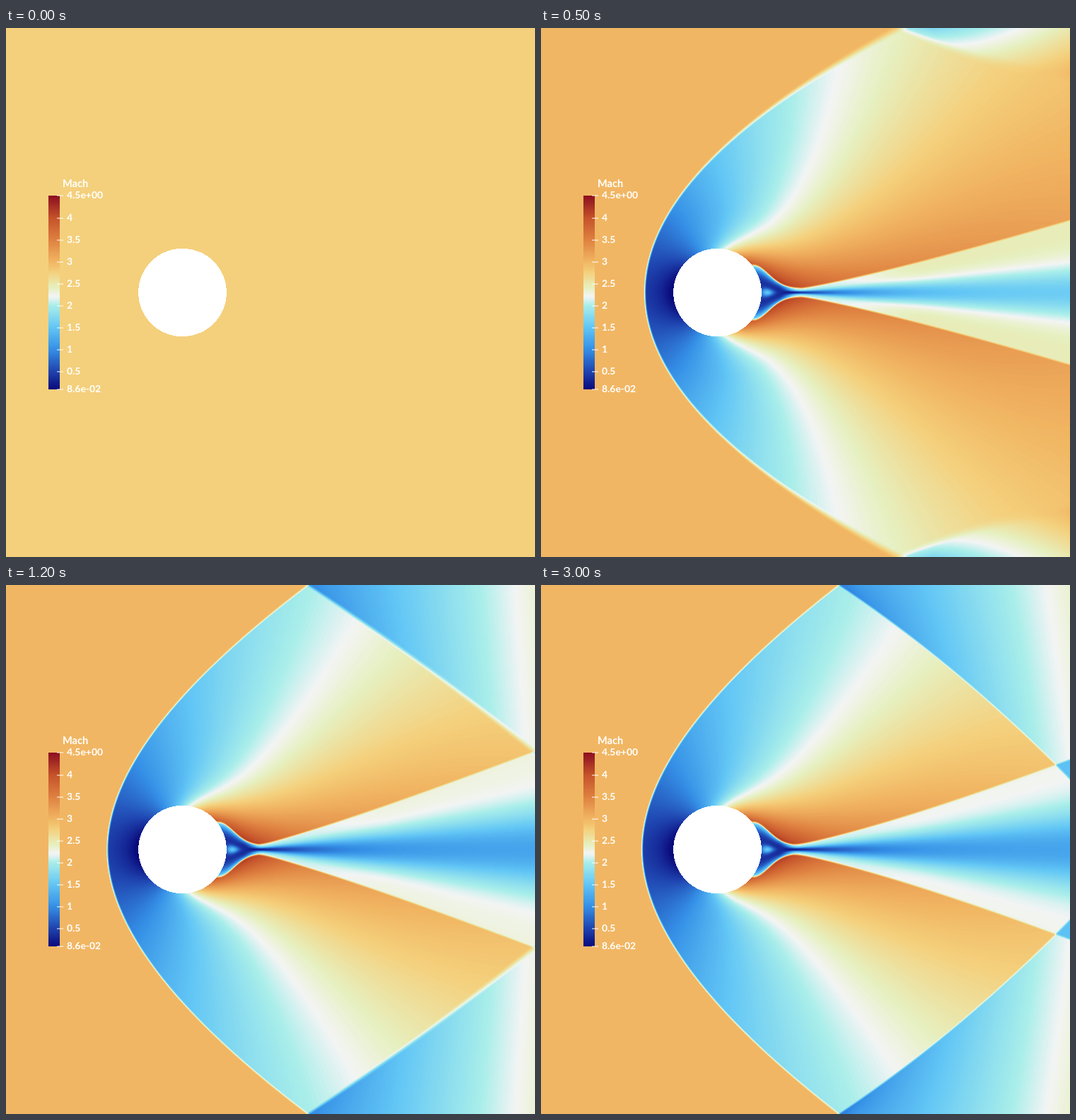
An HTML page with a canvas for the animation above (3.1 s loop, 748 px wide and 748 px high).

```html
<!DOCTYPE html>
<html lang="en">
<head>
<meta charset="utf-8">
<title>Mach number around a cylinder</title>
<style>
  html, body { margin: 0; width: 100%; height: 100%; overflow: hidden; }
  canvas, svg { position: absolute; left: 0; top: 0; width: 748px; height: 748px; }
  text { font: 700 13.9px Lato, "Open Sans", sans-serif; fill: #fff; }
  .title { font-size: 14.6px; }
</style>
</head>
<body>
<canvas id="flow" width="748" height="748"></canvas>
<svg id="legend" viewBox="0 0 748 748">
  <circle cx="249.5" cy="374" r="62.3" fill="#fff" shape-rendering="crispEdges"/>
  <text class="title" x="80" y="225">Mach</text>
</svg>
<script>
const SIZE = 748, MID = 374, CX = 249.5, RADIUS = 62;
const STEP = 100, STEPS = 31, SETTLED = 18;
const LOW = 0.086, HIGH = 4.5;
const BAR = { x: 60, y: 237, w: 16, h: 274 };

// Colour map: Mach number to colour
const STOPS = [
  [LOW, 0x0a0a7c], [0.5, 0x1f45b0], [1, 0x3590e6], [1.5, 0x62c6f5],
  [2, 0xa9eeea], [2.2, 0xf3f4f4], [2.4, 0xe6f0c0], [2.75, 0xf4d07c],
  [3, 0xf1b562], [3.5, 0xde8040], [4, 0xc4522a], [HIGH, 0x8c0f20]
];

const { exp, max, min, hypot } = Math;
const mix = (a, b, t) => a + (b - a) * t;
const clamp = v => max(0, min(1, v));
const smooth = (a, b, v) => {
  const t = clamp((v - a) / (b - a));
  return t * t * (3 - 2 * t);
};
const bell = v => exp(-v * v);

const palette = Uint32Array.from({ length: 256 }, (_, n) => {
  const m = mix(LOW, HIGH, n / 255);
  const i = max(1, STOPS.findIndex(stop => stop[0] >= m - 1e-9));
  const [m0, c0] = STOPS[i - 1], [m1, c1] = STOPS[i], t = (m - m0) / (m1 - m0);
  const channel = s => Math.round(mix(c0 >> s & 255, c1 >> s & 255, t));
  return (255 << 24 | channel(0) << 16 | channel(8) << 8 | channel(16)) >>> 0;
});
const colorOf = m => palette[Math.round(clamp((m - LOW) / (HIGH - LOW)) * 255)];

// Stages of the flow, blended in time:
// nose, bend, flare, fuzz   bow shock position, shape and softness far out
// heat                      extra Mach number away from the body
// neck, open, power         wake outline
// core, rim, spread, cap    Mach on the wake axis and rim, core width, wake tip
// dive, curl, haze          reflected shock slope, curvature, softness
// after, drop               Mach number behind the reflected shock
const STAGES = [
  { at: 3, nose: 150, bend: 390, flare: -0.3, fuzz: 14, heat: 0.6,
    neck: 375, open: 0.145, power: 1.1, core: 1.15, rim: 2.5, spread: 0.58, cap: 700,
    dive: 0, curl: 0, haze: 1, after: 1.5, drop: -0.5 },
  { at: 5, nose: 147, bend: 366, flare: 0.06, fuzz: 6, heat: 0.35,
    neck: 368, open: 0.102, power: 1.153, core: 1.6, rim: 2.45, spread: 0.38, cap: 1100,
    dive: 0.45, curl: -0.0007, haze: 12, after: 1.5, drop: -0.5 },
  { at: 9, nose: 144, bend: 365, flare: 0.313, fuzz: 0, heat: 0.1,
    neck: 358, open: 0.277, power: 1, core: 1.2, rim: 2.35, spread: 0.4, cap: 1100,
    dive: 0.64, curl: -0.0001, haze: 10, after: 1, drop: -0.05 },
  { at: SETTLED, nose: 143, bend: 365, flare: 0.369, fuzz: 0, heat: 0,
    neck: 356, open: 0.0936, power: 1.2, core: 1.2, rim: 2.23, spread: 0.42, cap: 1100,
    dive: 0.66, curl: 0.00055, haze: 1, after: 1, drop: 0.15 }
];

function stageAt(k) {
  const i = max(0, STAGES.findLastIndex(s => s.at <= k));
  const a = STAGES[i], b = STAGES[min(i + 1, STAGES.length - 1)];
  let t = a === b ? 0 : clamp((k - a.at) / (b.at - a.at));
  if (b.at === SETTLED) t = 1 - (1 - t) ** 2;
  const s = {};
  for (const name in a) s[name] = mix(a[name], b[name], t);
  return s;
}

// Flow between bow shock and wake: rises with the angle from the nose,
// plus an expansion that hugs the body
function outerMach(s, dx, y, r) {
  const c = -dx / r, front = c > 0;
  const t = max(0, (Math.atan2(y, -dx) - Math.PI / 2) / 1.396);
  const base = front ? 1.45 - 0.85 * c : 1.45 + 1.2 * t + 0.5 * t * t;
  const near = front ? 0.4 * exp(-5 * c) - 0.5 * c * c : 0.4 + 3 * t - 1.8 * t * t;
  const reach = 12 + (front ? 13 * c : 28 * t);
  const away = max(0, r - 120);
  return base + near * exp((RADIUS - r) / reach) + 0.0005 * (r - 250)
    + t ** 3 * (0.25 - 0.0016 * away) + s.heat * (1 - exp(-away / 250));
}

const wakeHeight = (s, x) =>
  6 + 33 * bell((x - 300) / 31) + s.open * max(0, x - s.neck) ** s.power;

function wakeMach(s, x, part) {
  const still = 0.3 + 1.8 * part ** 4 + 1.2 * bell((x - 320) / 9) * bell(part / 0.2);
  const rim = mix(2.1, s.rim, smooth(380, 550, x));
  const axis = s.core * (1 - exp(-max(0, x - 345) / 90));
  const core = mix(axis, rim, smooth(s.cap - 60, s.cap + 60, x));
  return mix(still, mix(rim, core, bell(part / s.spread)), smooth(335, 365, x));
}

function machField(k) {
  if (!k) return () => 2.75;
  const s = stageAt(k);
  const grow = min(1, k / 3) ** 0.8;
  const inflow = 177 * k;
  const shockX = y => s.nose + y * y / (s.bend + s.flare * y);
  const corner = shockX(MID);

  return (px, py) => {
    const free = mix(3, 2.75, smooth(inflow - 25, inflow + 25, px));
    let dx = px - CX, y = py, r = hypot(dx, y);
    if (r < RADIUS - 2) return free;

    // While it starts up, the pattern swells out from the body
    const swell = (RADIUS + (r - RADIUS) / grow) / r;
    dx *= swell; y *= swell; r *= swell;
    const x = CX + dx;

    // Bow shock, measured across the front
    const yc = min(y, MID), slope = shockX(yc + 1) - shockX(yc);
    const gap = (x - shockX(yc) - 2.2 * (y - yc)) / hypot(1, slope);
    const width = 2.2 + s.fuzz * (yc / MID) ** 3;
    let inside = smooth(-width, width, gap);
    if (grow < 1) inside *= 1 - smooth(380, 600, r);
    if (!inside) return free;

    let m = outerMach(s, dx, y, r);

    // Reflected shock
    const run = x - corner;
    let past = 0;
    if (run > -10 && s.dive) {
      const q = MID - s.dive * run - s.curl * run * run;
      const w = 2 + s.haze * clamp(0.3 + run / 330);
      past = smooth(-w, w, y - q);
      const low = 1 - clamp((y - q) / max(20, MID - q));
      m = mix(m, s.after + 0.0041 * max(0, run) - s.drop * low, past);
    }

    // Wake
    if (dx > 0) {
      const h = wakeHeight(s, x), part = 1 - smooth(-2, 2, y - h);
      if (part) m = mix(m, mix(wakeMach(s, x, min(1, y / h)), 1.45, past), part);
    }
    return mix(free, m, inside);
  };
}

function render(k) {
  const image = new ImageData(SIZE, SIZE), pixels = new Uint32Array(image.data.buffer);
  const mach = machField(k);
  for (let row = 0; row < MID; row++) {
    const a = row * SIZE, b = (SIZE - 1 - row) * SIZE;
    for (let x = 0; x < SIZE; x++)
      pixels[a + x] = pixels[b + x] = colorOf(mach(x + 0.5, MID - row - 0.5));
  }
  for (let j = 0; j < BAR.h; j++) {
    const at = (BAR.y + j) * SIZE + BAR.x;
    pixels.fill(colorOf(mix(HIGH, LOW, j / (BAR.h - 1))), at, at + BAR.w);
  }
  return image;
}

// Legend ticks and labels
const legend = document.getElementById("legend");
function add(tag, attrs, text = "") {
  const el = document.createElementNS(legend.namespaceURI, tag);
  for (const name in attrs) el.setAttribute(name, attrs[name]);
  el.textContent = text;
  legend.append(el);
}
function addTick(m, label) {
  const y = Math.ceil(BAR.y + BAR.h * (HIGH - m) / (HIGH - LOW));
  add("rect", { x: 72, y: y - 0.5, width: 9, height: 1, fill: "#fff" });
  add("text", { x: 86, y: y + 4.3 }, label);
}
addTick(HIGH, "4.5e+00");
for (let m = 4; m > 0; m -= 0.5) addTick(m, String(m));
addTick(LOW, "8.6e-02");

const ctx = document.getElementById("flow").getContext("2d");
const images = [];
let shown = -1;
const begin = performance.now();
function draw(now) {
  const k = min(SETTLED, Math.floor(max(0, now - begin) / STEP) % STEPS);
  if (k !== shown) {
    images[k] = images[k] || render(k);
    ctx.putImageData(images[k], 0, 0);
    shown = k;
  }
  requestAnimationFrame(draw);
}
draw(begin);
</script>
</body>
</html>
```
